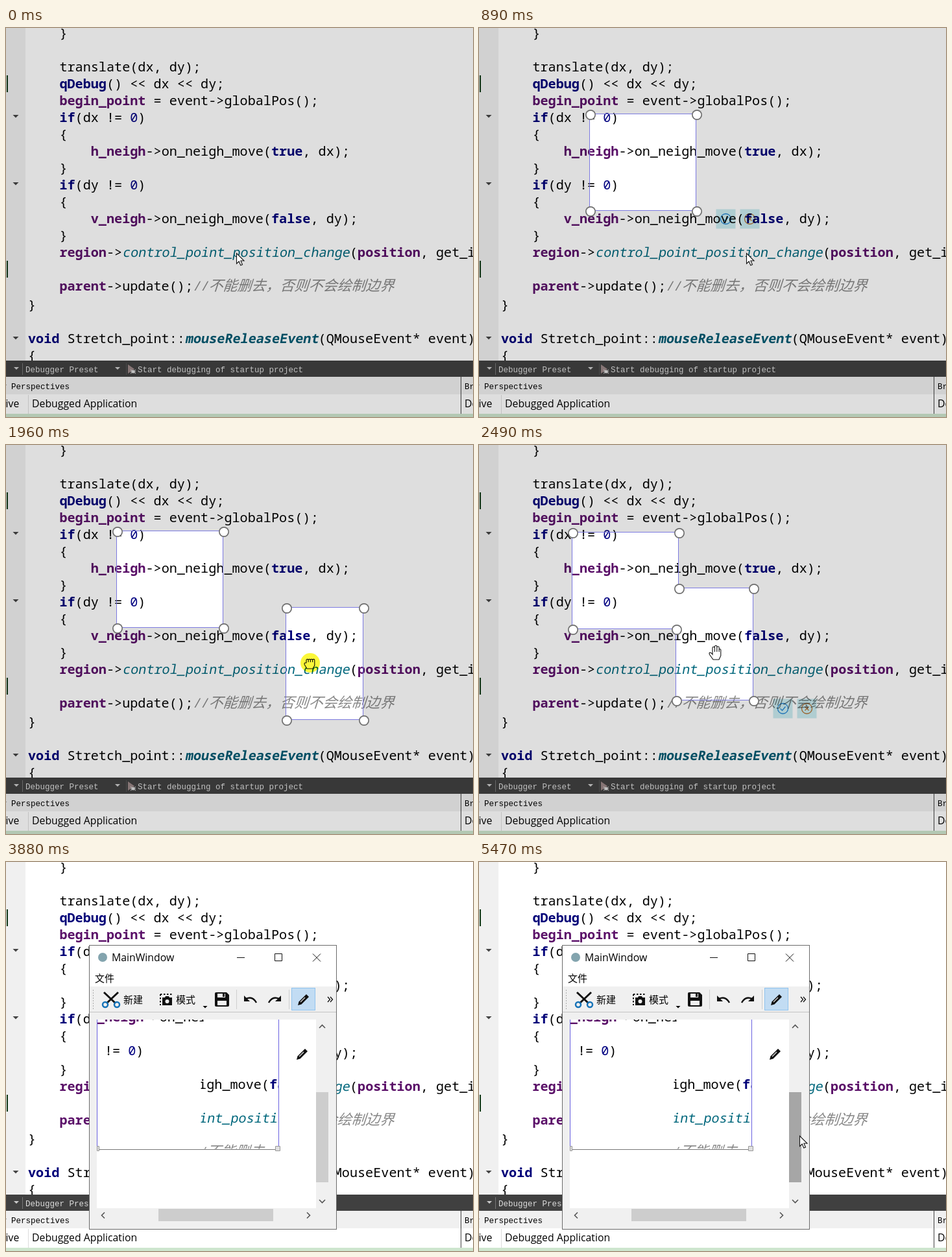
Recreate the animation shown at these times as an HTML page with a canvas. Size 720 by 600 pixels, loop 6.07 s.

```html
<!DOCTYPE html>
<html lang="zh-CN">
<head>
<meta charset="utf-8">
<style>
html, body { margin: 0; width: 100%; height: 100%; overflow: hidden; background: #fff; }
canvas { display: block; }
</style>
</head>
<body>
<canvas width="720" height="600"></canvas>
<script>
const ctx = document.querySelector('canvas').getContext('2d');
const LOOP = 6070;

const MONO = '"Noto Sans Mono", "DejaVu Sans Mono", monospace';
const CJK = '"Noto Sans CJK SC", "Noto Sans CJK", sans-serif';
const UI = '15.8px "Open Sans", "Noto Sans", sans-serif';
const BAR = '12.5px "Liberation Mono", monospace';
const COLUMN = 12.096;

// Weight, slant and colour of: plain, keyword, member, function, virtual, number, comment, wide comment
const STYLES = {
  p: ['', 0, '#000'], k: ['bold', 0, '#000078'], m: ['bold', 0, '#5a0f68'], f: ['', .18, '#00677c'],
  v: ['bold', .18, '#005a72'], n: ['', 0, '#000080'], c: ['', .18, '#888'], w: ['', .33, '#888'],
};
// Row, column, then runs separated by "|", each led by its style letter
const CODE = [
  [0, 4, 'p}'],
  [2, 4, 'ptranslate(dx, dy);'],
  [3, 4, 'kqDebug|p() << dx << dy;'],
  [4, 4, 'mbegin_point|p = event->globalPos();'],
  [5, 4, 'kif|p(dx != |n0|p)'],
  [6, 4, 'p{'],
  [7, 8, 'mh_neigh|p->on_neigh_move(|ktrue|p, dx);'],
  [8, 4, 'p}'],
  [9, 4, 'kif|p(dy != |n0|p)'],
  [10, 4, 'p{'],
  [11, 8, 'mv_neigh|p->on_neigh_move(|kfalse|p, dy);'],
  [12, 4, 'p}'],
  [13, 4, 'mregion|p->|fcontrol_point_position_change|p(|mposition|p, get_index());'],
  [15, 4, 'mparent|p->update();|c//|w不能删去，否则不会绘制边界'],
  [16, 0, 'p}'],
  [18, 0, 'kvoid|p Stretch_point::|vmouseReleaseEvent|p(QMouseEvent* event)'],
  [19, 0, 'p{'],
];

// Pointer path: time, x, y
const POINTER = [
  [0, 355, 347], [60, 355, 347], [250, 171, 133], [650, 335, 282], [890, 412, 347], [950, 412, 347],
  [1150, 432, 251], [1600, 551, 424], [1930, 468, 337], [2020, 468, 337], [2170, 367, 305],
  [2290, 391, 318], [2430, 364, 320], [2550, 364, 320], [2860, 466, 403], [2960, 466, 403],
  [3130, 461, 371], [4670, 620, 610], [5210, 494, 422],
];
const PRESSES = [[250, 650], [1150, 1600], [1960, 2170], [2290, 2430], [2880, 2950]];
const CONFIRM = 3020, WINDOW_OPEN = 3480;

const ARROW = new Path2D('M.5 .5V16.5L4.2 13L6.8 19L9.5 18L6.9 12H12Z');
const HAND = new Path2D('M-3 11L-8 4Q-10 1-8 0Q-6 0-4 3V-7a1.7 1.7 0 0 1 3.4 0V-9a1.7 1.7 0 0 1 3.4 0V-7.5a1.7 1.7 0 0 1 3.4 0V-4a1.3 1.3 0 0 1 2.6 0V5L6 11ZM-.6-7V-1M2.8-7.5V-1M6.2-5V-1');
const FIST = new Path2D('M-4 8L-7 3Q-9 0-7-1L-5-1V-5a1.6 1.6 0 0 1 3.2 0a1.6 1.6 0 0 1 3.2 0a1.6 1.6 0 0 1 3.2 0a1.6 1.6 0 0 1 3.2 0V3L5 8ZM-1.8-5V-2M1.4-5V-2M4.6-5V-2');
const PEN = new Path2D('M-9 9L-7.5 3.5L4-8L8-4L-3.5 7.5Z');

const during = (t, [start, end]) => t >= start && t < end;
const clamp = (v, lo, hi) => Math.max(lo, Math.min(hi, v));

function pointer(t) {
  const i = POINTER.findIndex(key => key[0] > t);
  if (i < 0) return POINTER.at(-1).slice(1);
  const [t0, x0, y0] = POINTER[i - 1], [t1, x1, y1] = POINTER[i];
  const u = (t - t0) / (t1 - t0), e = u * u * (3 - 2 * u);
  return [x0 + (x1 - x0) * e, y0 + (y1 - y0) * e];
}

function dragged(t, start, end) {
  const [x0, y0] = pointer(start), [x, y] = pointer(clamp(t, start, end));
  return [x - x0, y - y0];
}

function box(x, y, w, h, color) {
  ctx.fillStyle = color;
  ctx.fillRect(x, y, w, h);
}

function text(str, x, y, font, color) {
  ctx.font = font;
  ctx.fillStyle = color;
  ctx.fillText(str, x, y);
}

function stroke(d, color, width = 1) {
  ctx.strokeStyle = color;
  ctx.lineWidth = width;
  ctx.stroke(d instanceof Path2D ? d : new Path2D(d));
}

function fill(d, color) {
  ctx.fillStyle = color;
  ctx.fill(d instanceof Path2D ? d : new Path2D(d));
}

function disc(x, y, r, color) {
  ctx.beginPath();
  ctx.arc(x, y, r, 0, 7);
  ctx.fillStyle = color;
  ctx.fill();
}

function at(x, y, draw) {
  ctx.save();
  ctx.translate(x, y);
  draw();
  ctx.restore();
}

function multiply(draw) {
  ctx.globalCompositeOperation = 'multiply';
  draw();
  ctx.globalCompositeOperation = 'source-over';
}

const triangle = (x, y, color, r = 4) => fill(`M${x - r} ${y - 2}h${2 * r}l${-r} ${r}z`, color);

function code() {
  for (const [row, column, runs] of CODE) {
    let x = 34 + column * COLUMN;
    const y = 15 + row * 26 + (row > 15 ? 3 : 0);
    for (const run of runs.split('|')) {
      const [weight, slant, color] = STYLES[run[0]], str = run.slice(1);
      const font = run[0] === 'w' ? `22px ${CJK}` : `${weight} 20.16px ${MONO}`;
      if (slant) {
        at(x, y, () => {
          ctx.transform(1, 0, -slant, 1, 0, 0);
          text(str, 0, 0, font, color);
        });
      } else text(str, x, y, font, color);
      x += str.length * COLUMN;
    }
  }
}

function editor() {
  box(0, 0, 720, 600, '#fff');
  box(0, 0, 30, 513, '#f0f0f0');
  for (const y of [73, 359]) box(1, y, 2, 26, '#123a18');
  for (const y of [136, 240, 478]) triangle(15, y, '#444', 4.5);
  code();

  box(0, 513, 720, 25, '#404040');
  triangle(16, 525, '#ccc');
  triangle(172, 525, '#ccc');
  box(25, 517, 1, 18, '#777');
  box(185, 517, 1, 18, '#555');
  text('Debugger Preset', 30, 531, BAR, '#ddd');
  text('Start debugging of startup project', 203, 531, BAR, '#ddd');
  fill('M188 519L198 526L188 533Z', '#9a8686');
  disc(196, 530, 2.5, '#ddd');
  stroke('M192 527l8 6m0-6l-8 6M192 530h8', '#ddd');

  box(0, 538, 720, 27, '#f0f0f0');
  text('r', -6, 557, BAR, '#000');
  text('Perspectives', 8, 557, BAR, '#000');
  text('Br', 707, 557, BAR, '#000');
  text('tive', -6, 585, UI, '#000');
  text('Debugged Application', 40, 585, UI, '#000');
  text('Do', 707, 585, UI, '#000');
  box(34, 566, 1, 29, '#ddd');
  box(0, 595, 720, 5, '#cde6ce');
  box(701, 538, 1, 57, '#444');
}

const corners = ([x, y, w, h]) => [[x, y], [x + w, y], [x + w, y + h], [x, y + h]];

function merged([ax, ay, aw, ah], [bx, by, bw, bh]) {
  return [[ax, ay], [ax + aw, ay], [ax + aw, by], [bx + bw, by],
    [bx + bw, by + bh], [bx, by + bh], [bx, ay + ah], [ax, ay + ah]];
}

const outline = points => new Path2D(`M${points.join('L')}Z`);
const CAPTURE = outline(merged([143.5, 134.5, 164, 149], [303.5, 220.5, 119, 173]));

function rectangles(t) {
  const rects = [];
  const grow = (start, end, x, y, w, h) => {
    if (t <= start) return;
    const [dx, dy] = dragged(t, start, end), [ex, ey] = dragged(end, start, end);
    rects.push([x, y, w * dx / ex, h * dy / ey]);
  };
  grow(250, 650, 170.5, 132.5, 164, 149);
  grow(1150, 1600, 431.5, 250.5, 119, 173);
  const single = dragged(t, 2020, 2170), both = dragged(t, 2290, 2430);
  rects.forEach((r, i) => {
    r[0] += both[0] + i * single[0];
    r[1] += both[1] + i * single[1];
  });
  return rects;
}

function confirmButtons(x, y) {
  [['#2b8fe0', 'M-4 0l3 3l5-6'], ['#e07a35', 'M-3-3l6 6m0-6l-6 6']].forEach(([color, mark], i) =>
    at(x + 46 + 37 * i, y + 13, () => multiply(() => {
      box(-15, -15, 30, 30, '#caecf0');
      stroke('M-8 0a8 8 0 1 0 16 0a8 8 0 1 0-16 0', color, 1.3);
      stroke(mark, color, 1.3);
    })));
}

function selection(rects, pressed, t) {
  const polygons = t >= 2170 ? [merged(...rects)] : rects.map(corners);
  const shade = new Path2D('M0 0H720V600H0Z');
  polygons.forEach(p => shade.addPath(outline(p)));
  ctx.fillStyle = 'rgba(0,0,0,.13)';
  ctx.fill(shade, 'evenodd');
  for (const polygon of polygons) {
    stroke(outline(polygon), '#7c7ae0');
    for (const [x, y] of polygon) {
      disc(x + 1.5, y + 1.5, 8, '#6e6e6e');
      disc(x + 1.5, y + 1.5, 6.3, '#fff');
    }
  }
  if (rects.length && !pressed) {
    const [x, y, w, h] = rects.at(-1);
    confirmButtons(x + w, y + h);
  }
}

function toolbar() {
  box(129, 192, 380, 40, '#f0f0f0');
  box(129, 231, 380, 1, '#c4c4c4');
  for (let y = 197; y < 228; y += 4) box(134, y, 1, 2, '#aaa');
  for (const x of [355, 436]) box(x, 197, 1, 30, '#d0d0d0');

  stroke('M151 201L169 218M173 201L155 218', '#111', 3);
  stroke('M149 220a4 4 0 1 0 8 0a4 4 0 1 0-8 0M167 220a4 4 0 1 0 8 0a4 4 0 1 0-8 0', '#1673b8', 2.5);
  text('新建', 181, 218, `15px ${CJK}`, '#000');

  ctx.setLineDash([2.5, 2.5]);
  stroke('M238 204H256M238 204V221', '#111', 2);
  ctx.setLineDash([]);
  fill('M241 209h4l1-2h5l1 2h4v12h-15z', '#111');
  disc(248.5, 215, 3, '#f0f0f0');
  text('模式', 262, 218, `15px ${CJK}`, '#000');
  triangle(307, 224, '#000', 3.5);

  fill('M322 203q0-2 2-2h16l4 4v16q0 2-2 2h-18q-2 0-2-2z', '#111');
  box(326, 203, 12, 6, '#f0f0f0');
  box(334, 203, 3, 5, '#111');
  box(326, 214, 14, 7, '#f0f0f0');

  stroke('M370 211Q380 206 386 217', '#111', 2.5);
  fill('M367 206v9h9z', '#111');
  stroke('M421 211Q411 206 405 217', '#111', 2.5);
  fill('M424 206v9h-9z', '#111');

  box(440, 194, 37, 35, '#8fc3ee');
  box(441, 195, 35, 33, '#c2dcf3');
  pen(459, 212);
  stroke('M496 208l3.5 4l-3.5 4M500 208l3.5 4l-3.5 4', '#111', 1.3);
}

function pen(x, y) {
  at(x, y, () => {
    fill(PEN, '#111');
    stroke('M-5 4L2-3', '#ddd', 1.2);
  });
}

function appWindow(hover) {
  box(128, 128, 382, 439, '#6b6b6b');
  box(129, 129, 380, 437, '#f0f0f0');
  box(129, 129, 380, 63, '#fff');
  disc(149, 147, 7, '#83a4ae');
  text('MainWindow', 163, 153, UI, '#000');
  stroke('M356 147.5H368M414.5 141.5h11v11h-11zM473 141.5l12 12m0-12l-12 12', '#111');
  text('文件', 137, 185, `15px ${CJK}`, '#000');
  toolbar();

  box(140, 243, 338, 291, '#fff');
  ctx.save();
  ctx.beginPath();
  ctx.rect(140, 243, 338, 291);
  ctx.clip();
  ctx.translate(-3, 49);
  ctx.clip(CAPTURE);
  code();
  ctx.restore();
  stroke('M140.5 243V443.5M420.5 243V443.5', '#6a62e0');
  stroke('M140 443.5H421', '#777');
  for (const [x, w] of [[140.5, 3], [415.5, 7]]) {
    box(x, 438.5, w, 7, '#e0e0e0');
    stroke(`M${x} 438.5h${w}v7h${-w}z`, '#999');
  }
  pen(457, 296);

  box(478, 355, 19, 139, hover ? '#a6a6a6' : '#cdcdcd');
  box(235, 535, 177, 19, '#cdcdcd');
  stroke('M483 256l4.5-4.5l4.5 4.5M483 521l4.5 4.5l4.5-4.5M152 540.5l-4.5 4.5l4.5 4.5M464 540.5l4.5 4.5l-4.5 4.5', '#555', 1.6);
}

const halo = (x, y, color) => multiply(() => disc(x, y, 15, color));

function cursor(t, rects, pressed) {
  const [x, y] = pointer(t);
  const drawing = during(t, PRESSES[0]) || during(t, PRESSES[1]);
  const over = rects.some(([rx, ry, w, h]) => x > rx && x < rx + w && y > ry && y < ry + h);
  const shape = !over || drawing ? ARROW : pressed ? FIST : HAND;
  at(x, y, () => {
    fill(shape, '#fff');
    stroke(shape, '#111', 1.1);
  });
  if (pressed) halo(x + 1, y - 1, '#fbf73a');
  else if (during(t, [CONFIRM, 3280])) halo(x - 1, y - 1, '#56fafa');
}

function draw(t) {
  const pressed = PRESSES.some(span => during(t, span));
  const rects = t < CONFIRM ? rectangles(t) : [];
  editor();
  if (t < CONFIRM) selection(rects, pressed, t);
  if (t >= WINDOW_OPEN) appWindow(t >= 5210);
  if (t < WINDOW_OPEN || t >= 4670) cursor(t, rects, pressed);
}

function frame() {
  draw(performance.now() % LOOP);
  requestAnimationFrame(frame);
}
frame();
</script>
</body>
</html>
```
